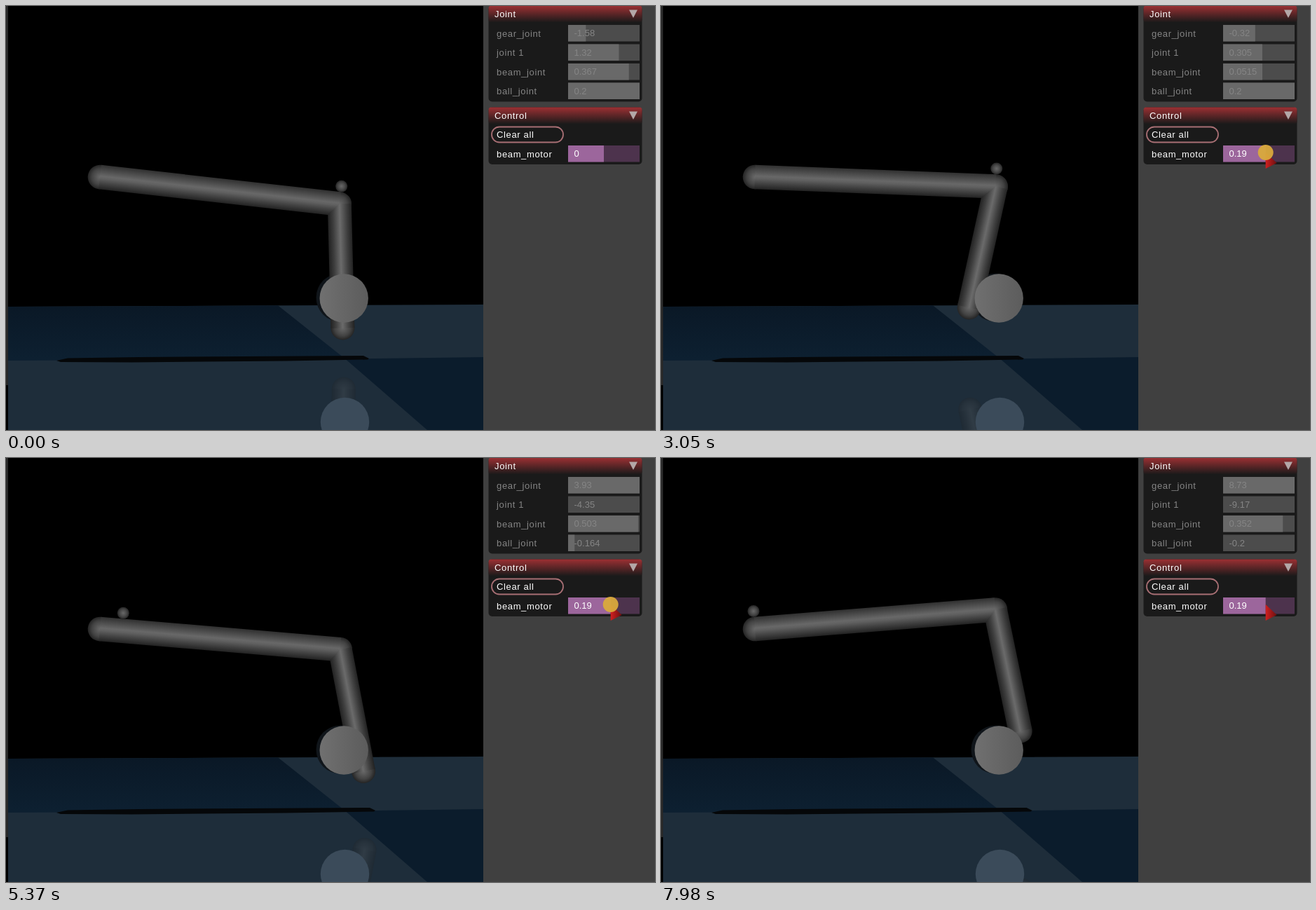
Animation of 926 by 605 pixels, one loop 8000 ms. Source, as an HTML page:

```html
<!DOCTYPE html>
<html lang="en">
<head>
<meta charset="utf-8">
<title>Ball and beam simulation</title>
<style>
  html, body { margin: 0; width: 100%; height: 100%; overflow: hidden; background: #000; }
  svg { display: block; width: 926px; height: 605px; }
  text { font: 13px "Liberation Sans", Arial, sans-serif; fill: #fff; white-space: pre; }
  .label { letter-spacing: .65px; }
  .off { fill: #858585; }
</style>
</head>
<body>
<svg viewBox="0 0 926 605">
  <defs>
    <linearGradient id="beamFill" x1="0" y1="-17.3" x2="0" y2="17.3" gradientUnits="userSpaceOnUse">
      <stop offset="0" stop-color="#303030"/><stop offset=".2" stop-color="#484848"/>
      <stop offset=".46" stop-color="#686868"/><stop offset=".56" stop-color="#606060"/>
      <stop offset=".76" stop-color="#434343"/><stop offset="1" stop-color="#222"/>
    </linearGradient>
    <linearGradient id="rodFill" x1="-17" y1="0" x2="17" y2="0" gradientUnits="userSpaceOnUse">
      <stop offset="0" stop-color="#222"/><stop offset=".22" stop-color="#3e3e3e"/>
      <stop offset=".5" stop-color="#6b6b6b"/><stop offset=".78" stop-color="#404040"/>
      <stop offset="1" stop-color="#222"/>
    </linearGradient>
    <radialGradient id="cap">
      <stop offset="0" stop-color="#686868"/><stop offset=".25" stop-color="#5a5a5a"/>
      <stop offset=".65" stop-color="#434343"/><stop offset="1" stop-color="#242424"/>
    </radialGradient>
    <linearGradient id="face">
      <stop offset="0" stop-color="#707070"/><stop offset="1" stop-color="#5c5c5c"/>
    </linearGradient>
    <linearGradient id="far" x1="0" y1="0" x2="0" y2="1">
      <stop offset="0" stop-color="#0a1826"/><stop offset="1" stop-color="#0d2031"/>
    </linearGradient>
    <linearGradient id="head" x1="0" y1="0" x2="0" y2="1">
      <stop offset="0" stop-color="#9c3033"/><stop offset="1" stop-color="#1a1a1a"/>
    </linearGradient>
    <linearGradient id="arrow">
      <stop offset="0" stop-color="#d02020"/><stop offset="1" stop-color="#6a1010"/>
    </linearGradient>
    <clipPath id="view"><rect x="3" width="678" height="605"/></clipPath>
    <clipPath id="ground"><path d="M3 429L681 426V605H3Z"/></clipPath>
    <clipPath id="miter"><polygon id="miterCut"/></clipPath>
  </defs>

  <rect width="926" height="605"/>
  <rect width="3" height="541" fill="#282828"/>

  <g clip-path="url(#view)">
    <path d="M3 429L681 426V605H3Z" fill="#1e2d3a"/>
    <path d="M3 429L388 427.3L484 503.5L3 506Z" fill="url(#far)"/>
    <path d="M484 503.5L681 501V605H601Z" fill="#0b1c2c"/>
    <path id="shadow" fill="#050709"/>
    <g clip-path="url(#ground)">
      <g transform="translate(1.5 1006) scale(1 -1)" opacity=".24"><use href="#rod"/></g>
      <circle cx="483.5" cy="593.5" r="34.7" fill="#3b4b5a"/>
    </g>
    <circle cx="477" cy="416" r="34.5" fill="#10151a"/>
    <g id="beam">
      <circle r="17.3" fill="url(#cap)"/>
      <circle cx="344" r="17.3" fill="url(#cap)"/>
      <rect y="-17.3" width="344" height="34.6" fill="url(#beamFill)"/>
    </g>
    <g id="rod">
      <g clip-path="url(#miter)">
        <circle r="17" fill="url(#cap)"/>
        <circle cy="177" r="17" fill="url(#cap)"/>
        <rect x="-17" width="34" height="177" fill="url(#rodFill)"/>
      </g>
    </g>
    <circle cx="482.2" cy="417" r="34.7" fill="url(#face)"/>
    <circle id="ball" r="8.5" fill="url(#cap)"/>
  </g>

  <rect x="681" width="245" height="605" fill="#404040"/>
  <g id="panel"></g>
  <path id="cursor" d="M0 0V23L16 15Z" fill="url(#arrow)"/>
  <circle id="halo" r="11" fill="#d9aa3c" opacity=".95"/>
</svg>
<script>
const LOOP = 8000, STEP = 67.45, PLAY = 1497;
const PIVOT = { x: 134, y: 244 }, HUB = { x: 480, y: 417 };
const BEAM = 344, ROD = 177, CRANK = 42.5;
const NS = 'http://www.w3.org/2000/svg';
const $ = id => document.getElementById(id);
const clamp = (v, a, b) => Math.min(b, Math.max(a, v));

// Keys are [step, value], with steps counted from the press on the slider.
const gearKeys = [[0, -1.58], [4, -1.79], [8, -1.76], [12, -1.5], [35, 1.04],
  [46, 2.44], [71, 5.78], [86, 7.43], [96, 8.73], [97, 8.86]];
const motorKeys = [[0, -.1], [8, .03], [12, .19]];
const pathX = [[-13, 13], [-8, 461], [-3, 847]];
const pathY = [[-13, 500], [-8, 572], [-3, 206], [0, 206], [4, 209]];

function segment(keys, n) {
  let i = 0;
  while (i < keys.length - 2 && n >= keys[i + 1][0]) i++;
  const [a, b] = [keys[i], keys[i + 1]];
  return { i, a, b, u: clamp((n - a[0]) / (b[0] - a[0]), 0, 1) };
}

function linear(keys, n) {
  const { a, b, u } = segment(keys, n);
  return a[1] + (b[1] - a[1]) * u;
}

function smooth(keys, n) {
  const { i, a, b, u } = segment(keys, n);
  const slope = k => {
    const p = keys[Math.max(k - 1, 0)], q = keys[Math.min(k + 1, keys.length - 1)];
    return k ? (q[1] - p[1]) / (q[0] - p[0]) : 0;
  };
  const w = b[0] - a[0], v = 1 - u;
  return a[1] * v * v * (1 + 2 * u) + b[1] * u * u * (3 - 2 * u)
    + w * u * v * (slope(i) * v - slope(i + 1) * u);
}

// The ball rolls down whichever way the beam leans, until it meets an end stop.
function ballAt(gear) {
  if (gear < 0) return .2;
  const phase = gear % (2 * Math.PI), left = phase < Math.PI;
  const p = left ? phase : phase - Math.PI;
  const roll = Math.min(.4, .464 * (p - Math.sin(p)));
  return left ? .2 - roll : roll - .2;
}

function linkage(gear) {
  const pin = { x: HUB.x - CRANK * Math.cos(gear), y: HUB.y - CRANK * Math.sin(gear) };
  const dx = pin.x - PIVOT.x, dy = pin.y - PIVOT.y, d = Math.hypot(dx, dy);
  const lean = Math.atan2(dy, dx)
    - Math.acos((BEAM * BEAM + d * d - ROD * ROD) / (2 * BEAM * d));
  const elbow = { x: PIVOT.x + BEAM * Math.cos(lean), y: PIVOT.y + BEAM * Math.sin(lean) };
  const tilt = Math.atan2(pin.x - elbow.x, pin.y - elbow.y);
  return { pin, lean, elbow, tilt };
}

function add(tag, attrs, text = '') {
  const el = document.createElementNS(NS, tag);
  for (const k in attrs) el.setAttribute(k, attrs[k]);
  el.textContent = text;
  $('panel').append(el);
  return el;
}

function section(title, y, h) {
  add('rect', { x: 688.5, y, width: 219, height: h, rx: 5, fill: '#1a1a1a' });
  add('rect', { x: 688.5, y, width: 219, height: 24, rx: 4, fill: 'url(#head)' });
  add('text', { x: 697, y: y + 16.5, class: 'label' }, title);
  add('path', { d: `M889 ${y + 6}h12l-6 11.5z`, fill: '#b3a8a8' });
}

function slider(name, y, range, live) {
  const off = live ? '' : ' off';
  add('text', { x: 700, y: y + 16.5, class: 'label' + off }, name);
  add('rect', { x: 802, y, width: 102, height: 23.5, fill: live ? '#4d334d' : '#4c4c4c' });
  const bar = add('rect', { x: 802, y, height: 23.5, fill: live ? '#9c669c' : '#696969' });
  const value = add('text', { x: 810.5, y: y + 16, class: off });
  return (v, digits) => {
    bar.setAttribute('width', 102 * clamp((v + range) / (2 * range), 0, 1));
    value.textContent = digits;
  };
}

section('Joint', -.5, 137);
const gearRow = slider('gear_joint', 27, Math.PI);
const crankRow = slider('joint 1', 54.5, Math.PI);
const beamRow = slider('beam_joint', 82, Math.PI / 6);
const ballRow = slider('ball_joint', 109.5, .2);
section('Control', 144.5, 81.5);
add('rect', { x: 693, y: 172.5, width: 102, height: 22, rx: 11, fill: '#1a1a1a',
  stroke: '#a86f74', 'stroke-width': 1.8 });
add('text', { x: 700, y: 188, class: 'label' }, 'Clear all');
const motorRow = slider('beam_motor', 199, 1, true);

const deg = a => a * 180 / Math.PI;
const brief = v => String(parseFloat(v.toPrecision(3)));
const place = (id, x, y, a = 0) =>
  $(id).setAttribute('transform', `translate(${x} ${y}) rotate(${deg(a)})`);

function cutMiter(lean, tilt) {
  const a = lean + Math.PI + tilt, bx = Math.cos(a), by = Math.sin(a);
  const dl = Math.hypot(bx, by + 1), nl = Math.hypot(bx, 1 - by);
  const point = (s, m) =>
    `${s * bx / dl - m * bx / nl},${s * (by + 1) / dl + m * (1 - by) / nl}`;
  $('miterCut').setAttribute('points',
    [point(-300, 0), point(300, 0), point(300, 400), point(-300, 400)].join(' '));
}

function draw(t) {
  const n = Math.floor((t - PLAY) / STEP);
  const gear = smooth(gearKeys, n), ball = ballAt(gear);
  const motor = n < 0 ? 0 : linear(motorKeys, n);
  const { pin, lean, elbow, tilt } = linkage(gear);

  place('beam', PIVOT.x, PIVOT.y, lean);
  place('rod', elbow.x, elbow.y, -tilt);
  cutMiter(lean, tilt);

  const along = (ball + .2) / .4 * BEAM, c = Math.cos(lean), s = Math.sin(lean);
  place('ball', PIVOT.x + along * c + 25.5 * s, PIVOT.y + along * s - 25.5 * c);

  const end = Math.max(518, pin.x + 17);
  $('shadow').setAttribute('d',
    `M72 506L88 502.5L190 501L${end - 8} 499L${end} 503L${end - 2} 504.5L400 506.5L180 508.5L78 508Z`);

  gearRow(gear, brief(gear));
  const crank = -gear - tilt - .232, bend = tilt + lean + .229;
  crankRow(crank, brief(crank));
  beamRow(bend, brief(bend));
  ballRow(ball, brief(ball));
  motorRow(motor, String(+motor.toFixed(2)));

  const x = n < 0 ? linear(pathX, n) : 853 + 51 * motor, y = linear(pathY, n);
  place('cursor', x, y);
  place('halo', x, y);
  $('cursor').style.display = n < -13 ? 'none' : '';
  $('halo').style.display = n >= 0 && n < 79 ? '' : 'none';
}

function tick() {
  draw(performance.now() % LOOP);
  requestAnimationFrame(tick);
}
tick();
</script>
</body>
</html>
```
